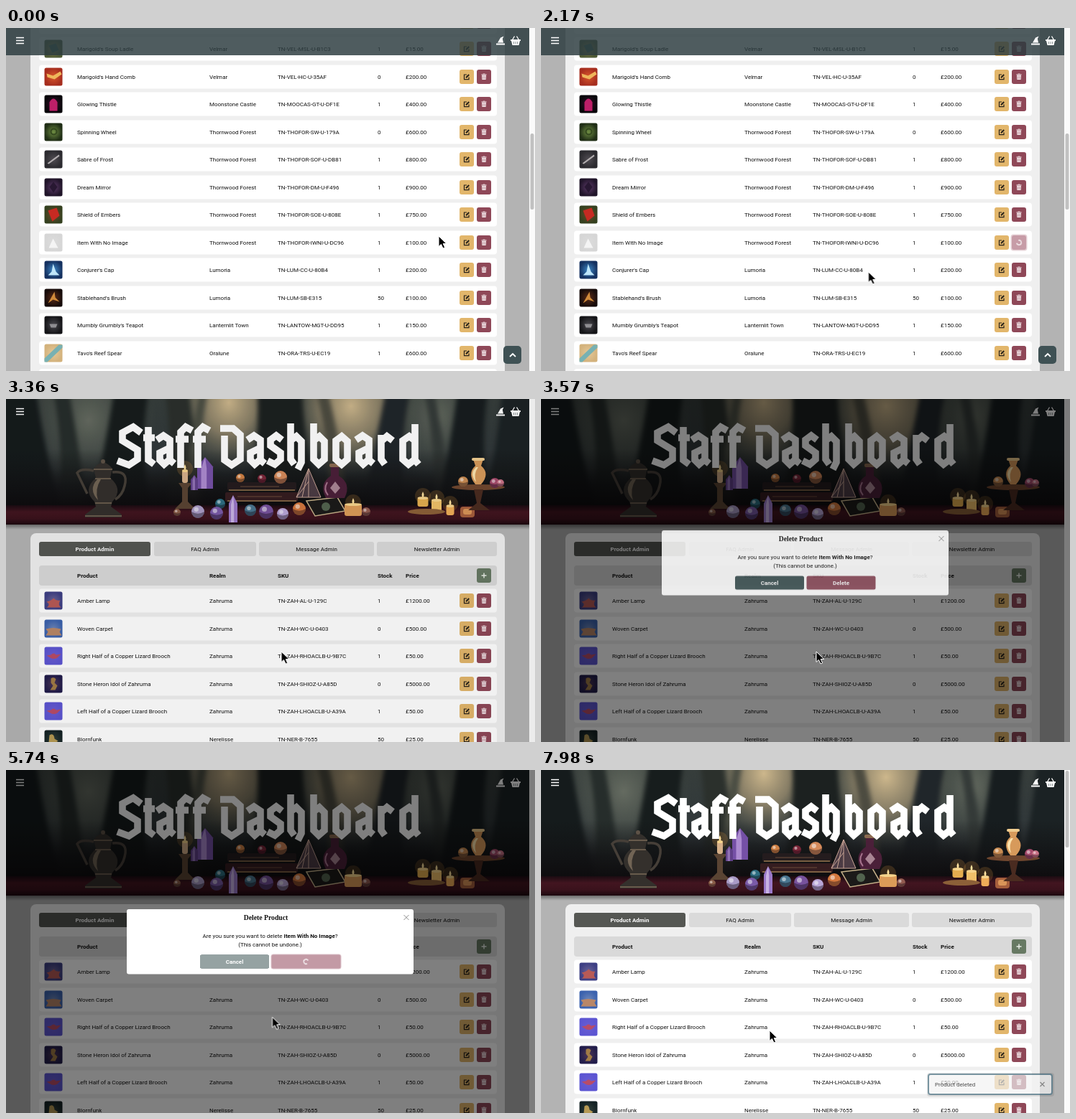
An HTML page for the animation above (8000 ms loop, 736x478 px).

```html
<!DOCTYPE html>
<html lang="en">
<head>
<meta charset="utf-8">
<title>Staff Dashboard</title>
<style>
html, body { margin: 0; width: 100%; height: 100%; overflow: hidden; background: #b3b3b3; }
svg { display: block; }
text { font: 8px Roboto, sans-serif; fill: #111; }
.b { font-weight: 700; }
.mid { text-anchor: middle; }
.light { fill: #fff; }
.modal-title { font: 700 9.7px "Liberation Serif", serif; }
.lettering path { fill: none; stroke: #fff; stroke-width: 9.6; stroke-linejoin: miter; }
.soft { filter: blur(3px); }

.spin { animation: spin .8s linear infinite; }
@keyframes spin { to { transform: rotate(360deg); } }

#cursor { animation: travel 8s ease-in-out infinite; }
@keyframes travel {
  0%, 2% { transform: translate(602px, 290px); }
  11.5%, 18% { transform: translate(665px, 298px); }
  32%, 37% { transform: translate(385px, 354px); }
  43%, 46% { transform: translate(383px, 352px); }
  56.5%, 62% { transform: translate(418px, 263px); }
  80%, 90% { transform: translate(335px, 405px); }
  98%, 100% { transform: translate(318px, 363px); }
}
#backdrop { animation: dim 8s linear infinite; }
@keyframes dim {
  0%, 41.8% { opacity: 0; }
  43.7%, 95.5% { opacity: .5; }
  95.6%, 100% { opacity: 0; }
}
#modal { animation: drop 8s ease-out infinite, appear 8s linear infinite; }
@keyframes drop {
  0%, 42.4% { transform: translateY(-50px); }
  46.15%, 100% { transform: none; }
}
@keyframes appear {
  0%, 42.4% { opacity: 0; }
  45%, 95.5% { opacity: 1; }
  95.6%, 100% { opacity: 0; }
}
#toast { animation: toast 8s linear infinite; }
@keyframes toast {
  0%, 97.9% { opacity: 0; }
  100% { opacity: .85; }
}
</style>
</head>
<body>
<script>
const DURATION = 8000;

// Step visibility: id -> list of [start, end] in ms
const windows = {
  listView: [[0, 2800]],
  topView: [[2800, DURATION]],
  topIcons: [[2960, 7650], [7790, DURATION]],
  rowBusy: [[1080, 2800]],
  pressed: [[4690, 4880]],
  modalBusy: [[4880, DURATION]],
  halo: [[990, 1150], [4690, 4850]],
  arrow: [[0, 2800], [3200, DURATION]],
  beam: [[2800, 3200]],
  topThumb: [[2800, 3340], [7650, DURATION]]
};
const stepCss = Object.entries(windows).map(([id, spans]) => {
  const stops = [`0%{opacity:${spans[0][0] === 0 ? 1 : 0}}`];
  for (const [start, end] of spans) {
    if (start > 0) stops.push(`${start / 80}%{opacity:1}`);
    if (end < DURATION) stops.push(`${end / 80}%{opacity:0}`);
  }
  return `@keyframes ${id}{${stops.join('')}}#${id}{animation:${id} 8s step-end infinite}`;
}).join('\n');

const rect = (x, y, w, h, fill, r = 0, extra = '') =>
  `<rect x="${x}" y="${y}" width="${w}" height="${h}" rx="${r}" fill="${fill}" ${extra}/>`;
const text = (x, y, str, cls = '') => `<text x="${x}" y="${y + 2.9}" class="${cls}">${str}</text>`;
const shape = (d, fill, extra = '') => `<path d="${d}" fill="${fill}" ${extra}/>`;
const line = (d, stroke, width, extra = '') =>
  `<path d="${d}" fill="none" stroke="${stroke}" stroke-width="${width}" ${extra}/>`;
const at = (x, y, content) => `<g transform="translate(${x} ${y})">${content}</g>`;
const ball = (x, y, r, fill, extra = '') => `<circle cx="${x}" cy="${y}" r="${r}" fill="${fill}" ${extra}/>`;
const oval = (x, y, rx, ry, fill) => `<ellipse cx="${x}" cy="${y}" rx="${rx}" ry="${ry}" fill="${fill}"/>`;
const spinner = (x, y, r = 3.2) =>
  at(x, y, `<g class="spin">${line(`M0 ${-r}A${r} ${r} 0 1 0 ${r} 0`, '#fff', 1.3)}</g>`);

// Icons
const editIcon = (x, y) => at(x, y,
  line('M0-3H-3.5V3.6H3V.5', '#28221a', 1.2) + line('M-1 1.2L3.2-3', '#28221a', 2));
const trashIcon = (x, y) => at(x, y,
  rect(-3.5, -3.6, 7, 1.1, '#f3e6e9') + rect(-1.3, -4.4, 2.6, 1, '#f3e6e9') +
  shape('M-3-2H3L2.6 4H-2.6Z', '#f3e6e9') + line('M-1.2-1V3M1.2-1V3', '#8f4858', .6));
const navIcons = line('M14 13.5H25M14 17.5H25M14 21.5H25', '#fff', 1.7) +
  shape('M682 21.6H694V23.6H682ZM684 20.6L688 13.5L692.5 11.6L690.8 15L692 20.6Z', '#fff') +
  shape('M702 16H716V18H715L713.5 24H704.5L703 18H702Z', '#fff') +
  line('M704.5 16.5L707.5 11.5M713.5 16.5L710.5 11.5', '#fff', 1.3) +
  line('M706.5 19V22.5M709 19V22.5M711.5 19V22.5', '#7b8587', .9);

// Thumbnails: base, glow, and one accent shape in a 25px box
let thumbCount = 0;
function thumb(y, [base, glow, accent, d]) {
  const id = 'thumb' + thumbCount++;
  return `<radialGradient id="${id}"><stop stop-color="${glow}"/><stop offset="1" stop-color="${base}"/></radialGradient>` +
    at(53.5, y - 12.5, rect(0, 0, 25, 25, `url(#${id})`, 2.5) + shape(d, accent));
}
const art = {
  ladle: ['#4e5a35', '#93864a', '#36584d', 'M6 8L16 5L20 14L11 18Z'],
  comb: ['#a62d1e', '#d9572c', '#efb65b', 'M3 8L12 11L22 5L24 9L14 16L4 13Z'],
  bloom: ['#08060a', '#37102a', '#bd1f68', 'M7 22V10Q12.5 0 18 10V22Z'],
  wheel: ['#202e16', '#6f8e43', '#34491f', 'M8 12A5 5 0 1 0 18 12A5 5 0 1 0 8 12ZM10 12A3 3 0 1 1 16 12A3 3 0 1 1 10 12Z'],
  blade: ['#2b2a2f', '#504c52', '#b3aeb0', 'M4 18L20 6L21 8L6 19Z'],
  mirror: ['#1f1428', '#5c3a68', '#281832', 'M12.5 5L18 12L12.5 20L7 12Z'],
  shield: ['#34401f', '#6f4a28', '#c72a22', 'M5 7L17 3L21 14L11 22Z'],
  blank: ['#d6d6d6', '#dcdcdc', '#f4f4f4', 'M6 20L12 7L19 20Z'],
  cap: ['#14305f', '#3d86c4', '#bfe6fa', 'M12 4L16 15L21 20H5L10 15Z'],
  brush: ['#160b0a', '#5c2c17', '#d08a3a', 'M5 20L14 4L15 12L21 18L12 15Z'],
  teapot: ['#141417', '#4b4a50', '#8f8e92', 'M7 11H18L16 16H9Z'],
  spear: ['#d3b27c', '#e6c99a', '#78b1b2', 'M0 20L20 1H25V5L4 25H0Z'],
  lamp: ['#3d3f84', '#6b6396', '#b85a56', 'M3 14Q9 13 13 9Q16 13 22 12Q18 18 23 22H3Q9 18 3 14Z'],
  carpet: ['#3b62ae', '#6d86b8', '#b98768', 'M2 13Q12 10 23 13L21 17L24 22H2L5 17Z'],
  brooch: ['#5c55d2', '#6a5ed3', '#b84c68', 'M3 12L9 11Q13 7 16 11L23 10L18 15Q13 18 8 15Z'],
  idol: ['#211c4a', '#4d3656', '#a27c46', 'M9 5Q13 2 16 6L14 11L18 15L15 21H8L12 15L9 11Z'],
  pipe: ['#142224', '#31403a', '#b69a54', 'M7 7Q13 3 14 12L19 15L12 20L6 17Z']
};

const actions = y => rect(631, y - 10, 20, 20, '#e2b66b', 3) + rect(655, y - 10, 20, 20, '#8f4858', 3);
const icons = y => editIcon(641, y) + trashIcon(665, y);
function row(y, [picture, name, realm, sku, stock, price]) {
  return rect(46, y - 16.5, 637, 33, '#fff', 4) + thumb(y, art[picture]) +
    text(99, y, name) + text(283, y, realm) + text(378, y, sku) +
    text(517, y, stock) + text(556, y, '£' + price + '.00') + actions(y);
}
const PITCH = 38.53;
const rowY = (first, i) => Math.round(first + i * PITCH);

const listRows = [
  ['ladle', "Marigold's Soup Ladle", 'Velmar', 'TN-VEL-MSL-U-B1C3', 1, 15],
  ['comb', "Marigold's Hand Comb", 'Velmar', 'TN-VEL-HC-U-35AF', 0, 200],
  ['bloom', 'Glowing Thistle', 'Moonstone Castle', 'TN-MOOCAS-GT-U-DF1E', 1, 400],
  ['wheel', 'Spinning Wheel', 'Thornwood Forest', 'TN-THOFOR-SW-U-179A', 0, 600],
  ['blade', 'Sabre of Frost', 'Thornwood Forest', 'TN-THOFOR-SOF-U-DB81', 1, 800],
  ['mirror', 'Dream Mirror', 'Thornwood Forest', 'TN-THOFOR-DM-U-F496', 1, 900],
  ['shield', 'Shield of Embers', 'Thornwood Forest', 'TN-THOFOR-SOE-U-808E', 1, 750],
  ['blank', 'Item With No Image', 'Thornwood Forest', 'TN-THOFOR-IWNI-U-DC96', 1, 100],
  ['cap', "Conjurer's Cap", 'Lumoria', 'TN-LUM-CC-U-80B4', 1, 200],
  ['brush', "Stablehand's Brush", 'Lumoria', 'TN-LUM-SB-E315', 50, 100],
  ['teapot', "Mumbly Grumbly's Teapot", 'Lanternlit Town', 'TN-LANTOW-MGT-U-DD95', 1, 150],
  ['spear', "Tavo's Reef Spear", 'Oralune', 'TN-ORA-TRS-U-EC19', 1, 600]
];
const topRows = [
  ['lamp', 'Amber Lamp', 'Zahruma', 'TN-ZAH-AL-U-129C', 1, 1200],
  ['carpet', 'Woven Carpet', 'Zahruma', 'TN-ZAH-WC-U-0403', 0, 500],
  ['brooch', 'Right Half of a Copper Lizard Brooch', 'Zahruma', 'TN-ZAH-RHOACLB-U-9B7C', 1, 50],
  ['idol', 'Stone Heron Idol of Zahruma', 'Zahruma', 'TN-ZAH-SHIOZ-U-A85D', 0, 5000],
  ['brooch', 'Left Half of a Copper Lizard Brooch', 'Zahruma', 'TN-ZAH-LHOACLB-U-A39A', 1, 50],
  ['pipe', 'Blornfunk', 'Nerelisse', 'TN-NER-B-7655', 50, 25]
];

// Blackletter strokes on a 60-unit line height
const glyphs = {
  S: 'M34 13L23 5L8 13V24L29 37V50L17 58L1 52',
  t: 'M9 5V51L17 57M2 20H18',
  a: 'M3 23L12 17L21 23V51L27 56M21 34L7 41V51L13 57L21 50',
  f: 'M9 62V12L16 5L25 10M2 22H20',
  D: 'M1 7H19L29 16V50L17 58L7 51V17',
  s: 'M22 23L14 17L6 23V31L20 41V50L12 57L2 52',
  h: 'M7 0V50L12 57M7 24L15 18L22 25V54L17 64',
  b: 'M7 0V50L14 57L22 50V25L15 18L7 24',
  o: 'M14 18L6 24V50L14 57L22 50V25Z',
  r: 'M8 16V50L13 57M8 25L16 18L24 24',
  d: 'M24 1V51L29 57M24 24L16 18L7 24V50L15 57L24 50'
};
const letters = [['S', 154], ['t', 189], ['a', 207], ['f', 234], ['f', 258], ['D', 297], ['a', 333], ['s', 362],
  ['h', 389], ['b', 421], ['o', 453], ['a', 484], ['r', 514], ['d', 545]];
const lettering = `<g class="lettering" role="img" aria-label="Staff Dashboard">${
  letters.map(([c, x]) => at(x, 34, `<path d="${glyphs[c]}"/>`)).join('')}</g>`;

const trunk = (x, w, lean, fill) =>
  shape(`M${x} -8H${x + w}Q${x + w + lean} 80 ${x + w * 1.4 + lean} 160H${x - w * .4 + lean}Q${x + lean} 80 ${x} -8Z`, fill);
const candle = (x, y, w, h, fill) => ball(x, y - 2, 11, '#f3a54a', 'opacity=".18"') +
  rect(x - w / 2, y, w, h, fill, 3) + oval(x, y + 1, w / 2, 2, '#f6d48c') +
  shape(`M${x} ${y - 8}Q${x + 3} ${y - 2} ${x} ${y}Q${x - 3} ${y - 2} ${x} ${y - 8}Z`, '#ffe3a0');
const gem = (x, y, w, h, fill, shine) =>
  shape(`M${x} ${y - h}L${x + w} ${y - h * .7}V${y}H${x - w}V${y - h * .7}Z`, fill) +
  shape(`M${x} ${y - h}L${x + w * .2} ${y - h * .65}V${y}H${x - w * .5}V${y - h * .65}Z`, shine, 'opacity=".55"');
const bead = (x, y, r, fill) => ball(x, y, r, fill) +
  shape(`M${x - r} ${y}A${r} ${r} 0 0 0 ${x + r} ${y}Q${x} ${y + r * .6} ${x - r} ${y}Z`, '#100812', 'opacity=".4"') +
  ball(x - r * .25, y - r * .35, r * .35, '#fff', 'opacity=".5"');

const forest = rect(0, 0, 728, 175, 'url(#forest)') +
  [[115, 30, 95, 110], [310, 5, 85, 100], [480, 10, 95, 105], [600, 25, 70, 95]]
    .map(([x, y, rx, ry], i) => oval(x, y, rx, ry, `url(#${i % 3 ? 'glow' : 'mist'})`)).join('') +
  '<g class="soft">' +
  [[-10, 52, 14, '#151b1c'], [66, 22, 16, '#262d2b'], [150, 48, -14, '#171d1d'], [222, 32, 12, '#2b302c'],
   [268, 12, -16, '#4a4d43'], [350, 62, 4, '#1c2120'], [432, 16, 22, '#4c4b40'], [528, 34, -18, '#20262a'],
   [582, 14, 18, '#343a38'], [628, 42, -12, '#171d1f'], [690, 50, -8, '#1b2224']].map(t => trunk(...t)).join('') +
  '</g>' + rect(0, 70, 728, 84, 'url(#ground)') + rect(0, 148, 728, 27, 'url(#table)');

const pitcher = shape('M122 97Q135 80 148 97L145 110Q164 126 148 143L146 150L161 161V165H110V161L125 150L123 143Q106 126 125 110Z', '#34302c') +
  line('M122 100Q104 96 99 103L113 132M148 102Q171 99 165 121Q162 134 152 140', '#463f38', 3.5) +
  shape('M127 112Q114 126 128 141Q123 126 132 112Z', '#8b7a66', 'opacity=".7"') +
  line('M122 98H148M124 111H146M124 145H147M110 163H161', '#796a57', 1.5) + ball(135, 87, 3, '#5e5247');

const hero = `<g clip-path="url(#heroClip)">` + forest + pitcher +
  candle(249, 99, 8, 18, '#d6b089') + shape('M240 117H259L253 124V143L263 153H235L245 143V124Z', '#5a4433') +
  gem(277, 125, 11, 44, '#7550a6', '#d9bcf2') + gem(262, 127, 5, 21, '#604089', '#b99ad8') +
  rect(308, 116, 96, 12, '#241c1e', 2) + rect(305, 130, 101, 13, '#351d20', 2) +
  line('M310 127H402M308 142H404', '#94764f', 1.5) + line('M326 122H380M322 136H384', '#6d4d3a', 1) +
  gem(316, 172, 6, 38, '#9a78c8', '#efe2fa') +
  [[326, 110, 6, '#cf8044'], [356, 111, 6, '#7a2638'], [382, 109, 9, '#d58a5a'], [298, 146, 7, '#2d6e82'],
   [267, 157, 9, '#a99bc6'], [293, 159, 9, '#7a5aa8'], [340, 155, 8, '#4a7690'], [362, 157, 10, '#77529d'],
   [385, 160, 8, '#b9a6d8'], [408, 153, 9, '#d4783e'], [238, 158, 5, '#8a5d48'], [501, 157, 6, '#925b50']
  ].map(b => bead(...b)).join('') +
  shape('M421 97L438 137H404Z', '#5b4650', 'opacity=".8"') +
  line('M421 97V137M421 97L438 137H404ZL412 137M421 115L404 137', '#c9a596', 1) +
  shape('M418 142L461 137L472 156L430 163Z', '#1c1a19') + line('M418 142L461 137L472 156L430 163Z', '#c6b28a', 1.5) +
  ball(445, 150, 6, '#52634e') +
  shape('M452 93H463V107Q481 118 471 138H445Q435 118 452 107Z', '#4b2039') + rect(450, 90, 15, 5, '#8c6b50', 2) +
  line('M447 116Q441 126 448 134', '#a6738d', 2) + shape('M458 115L465 124L458 132L451 124Z', '#a98594') +
  candle(483, 146, 24, 17, '#dc9b58') +
  candle(580, 137, 15, 13, '#e3ad4f') + candle(599, 140, 14, 17, '#f0c069') + candle(618, 148, 11, 14, '#efad58') +
  oval(585, 157, 26, 4, '#8c6038') + rect(632, 150, 20, 15, '#a65e3c', 4) + rect(636, 153, 12, 8, '#d99458', 3) +
  oval(657, 123, 37, 4, '#70472f') + shape('M651 126H664L660 145L673 155H643L655 145Z', '#4a2b20') +
  shape('M650 84H664L661 93Q674 104 661 119H653Q641 104 653 93Z', '#d79a5b') + rect(648, 82, 18, 4, '#f0cd90', 2) +
  shape('M654 95Q644 104 654 116Q650 104 657 95Z', '#fbe3ae') +
  [[680, 117, 7, '#a44a6b'], [636, 115, 7, '#c98c52'], [688, 117, 5, '#c87286']].map(b => bead(...b)).join('') +
  '</g>' + rect(0, 175, 728, 7, 'url(#shadow)');

const tabs = [[46, 155, 'Product Admin'], [206, 142, 'FAQ Admin'], [352, 160, 'Message Admin'], [516, 167, 'Newsletter Admin']]
  .map(([x, w, label], i) => rect(x, 199, w, 20, i ? '#dadada' : '#555753', 3) +
    text(x + w / 2, 209, label, i ? 'mid' : 'mid b light')).join('');
const columns = [[99, 'Product'], [283, 'Realm'], [378, 'SKU'], [517, 'Stock'], [556, 'Price']]
  .map(([x, label]) => text(x, 246, label, 'b')).join('');

const topY = i => rowY(281, i);
const topView = hero + lettering + rect(34, 187, 660, 300, '#efefef', 8) + tabs +
  rect(46, 232, 637, 28, '#d9d9d9', 4) + columns + rect(655, 236, 20, 20, '#677963', 3) +
  topRows.map((r, i) => row(topY(i), r)).join('') +
  `<g id="topIcons">${navIcons}${line('M661.5 246H668.5M665 242.5V249.5', '#e8ece6', 1.5)}${
    topRows.map((r, i) => icons(topY(i))).join('')}</g>`;

const listY = i => rowY(29, i);
const listView = rect(0, 0, 728, 478, '#b3b3b3') + rect(34, 0, 660, 478, '#efefef') +
  rect(46, -25, 637, 33, '#fff', 4) + actions(-9) +
  listRows.map((r, i) => row(listY(i), r) + icons(listY(i))).join('') +
  rect(46, 475, 637, 10, '#fff', 4) +
  `<g id="rowBusy">${rect(653.5, 287.5, 23, 23, '#e5d1d6', 4)}${rect(655, 289, 20, 20, '#c79ca7', 3)}${spinner(665, 299)}</g>` +
  rect(0, 0, 728, 38, '#2c3c3f', 0, 'opacity=".83"') + navIcons +
  rect(692, 443, 25, 25, '#3f5154', 5) + line('M701 458L705 454L709 458', '#fff', 1.8) +
  rect(728, 0, 8, 478, '#fafafa') + rect(729.5, 147, 5, 106, '#c1c1c1', 2.5);

const button = (x, fill, label) => rect(x, 257.5, 96, 19, fill, 2.5) + (label ? text(x + 48, 267, label, 'mid b light') : '');
const ring = rect(368.5, 256.5, 98, 21, '#dcc2c9', 3.5);
const modal = rect(168, 194, 399, 90.5, '#fff', 3) +
  `<text x="361.5" y="209" class="mid modal-title">Delete Product</text>` +
  line('M553.5 202L560.5 209M560.5 202L553.5 209', '#8c8c8c', 1) +
  text(367.5, 231, 'Are you sure you want to delete <tspan class="b">Item With No Image</tspan>?', 'mid') +
  text(367.5, 243, '(This cannot be undone.)', 'mid') +
  button(270, '#415557', 'Cancel') + button(369.5, '#8f4e5e', 'Delete') +
  `<g id="pressed">${ring}${button(369.5, '#a0636f', 'Delete')}</g>` +
  `<g id="modalBusy">${ring}${button(270, '#95a2a2', 'Cancel')}${button(369.5, '#c39aa5', '')}${spinner(417.5, 267)}</g>`;

const toast = rect(537, 422, 177, 33, '#000', 4, 'opacity=".12"') +
  rect(539, 424, 172, 28, '#f6f6f6', 3, 'fill-opacity=".9" stroke="#4d7282" stroke-width="2"') +
  text(548, 438, 'Product deleted') + line('M694.5 435L700.5 441M700.5 435L694.5 441', '#777', 1.2);

const beam = 'M-3-6Q0-6 0-4V4Q0 6-3 6M3-6Q0-6 0-4M0 4Q0 6 3 6';
const cursor = `<g id="halo">${ball(1, 3, 11, '#e79a3c', 'opacity=".65"')}</g>` +
  `<g id="arrow">${shape('M0 0V14.5L3.4 11.4L6 17L8.6 15.9L6.2 10.5H10.8Z', '#000', 'stroke="#fff" stroke-width="1"')}</g>` +
  `<g id="beam">${line(beam, '#fff', 2.6)}${line(beam, '#111', 1.2)}</g>`;

const gradient = (id, stops, kind = 'linearGradient') =>
  `<${kind} id="${id}" ${kind === 'linearGradient' ? 'x2="0" y2="1"' : ''}>${
    stops.map(([o, c, a = 1]) => `<stop offset="${o}" stop-color="${c}" stop-opacity="${a}"/>`).join('')}</${kind}>`;
const defs = gradient('forest', [[0, '#363d3b'], [.55, '#30373a'], [1, '#101213']]) +
  gradient('mist', [[0, '#6d7367', .85], [1, '#50584e', 0]], 'radialGradient') +
  gradient('glow', [[0, '#cdb78c'], [.45, '#9a8d70', .8], [1, '#50584e', 0]], 'radialGradient') +
  gradient('ground', [[0, '#121314', 0], [.6, '#111113', .8], [1, '#0d0b0d']]) +
  gradient('table', [[0, '#1b0c12'], [.35, '#421520'], [.7, '#3a121c'], [1, '#1c080e']]) +
  gradient('shadow', [[0, '#000', .4], [1, '#000', 0]]) +
  '<clipPath id="heroClip"><rect width="728" height="175"/></clipPath>';

document.head.insertAdjacentHTML('beforeend', `<style>${stepCss}</style>`);
document.body.innerHTML = `<svg width="736" height="478" viewBox="0 0 736 478"><defs>${defs}</defs>
  <g id="topView">${rect(0, 0, 728, 478, '#b3b3b3')}${topView}${rect(728, 0, 8, 478, '#fafafa')}
    <g id="topThumb">${rect(729.5, 1, 5, 107, '#c1c1c1', 2.5)}</g></g>
  <g id="listView">${listView}</g>
  <rect id="backdrop" width="736" height="478"/>
  <g id="modal">${modal}</g>
  <g id="toast">${toast}</g>
  <g id="cursor">${cursor}</g>
</svg>`;
</script>
</body>
</html>
```
